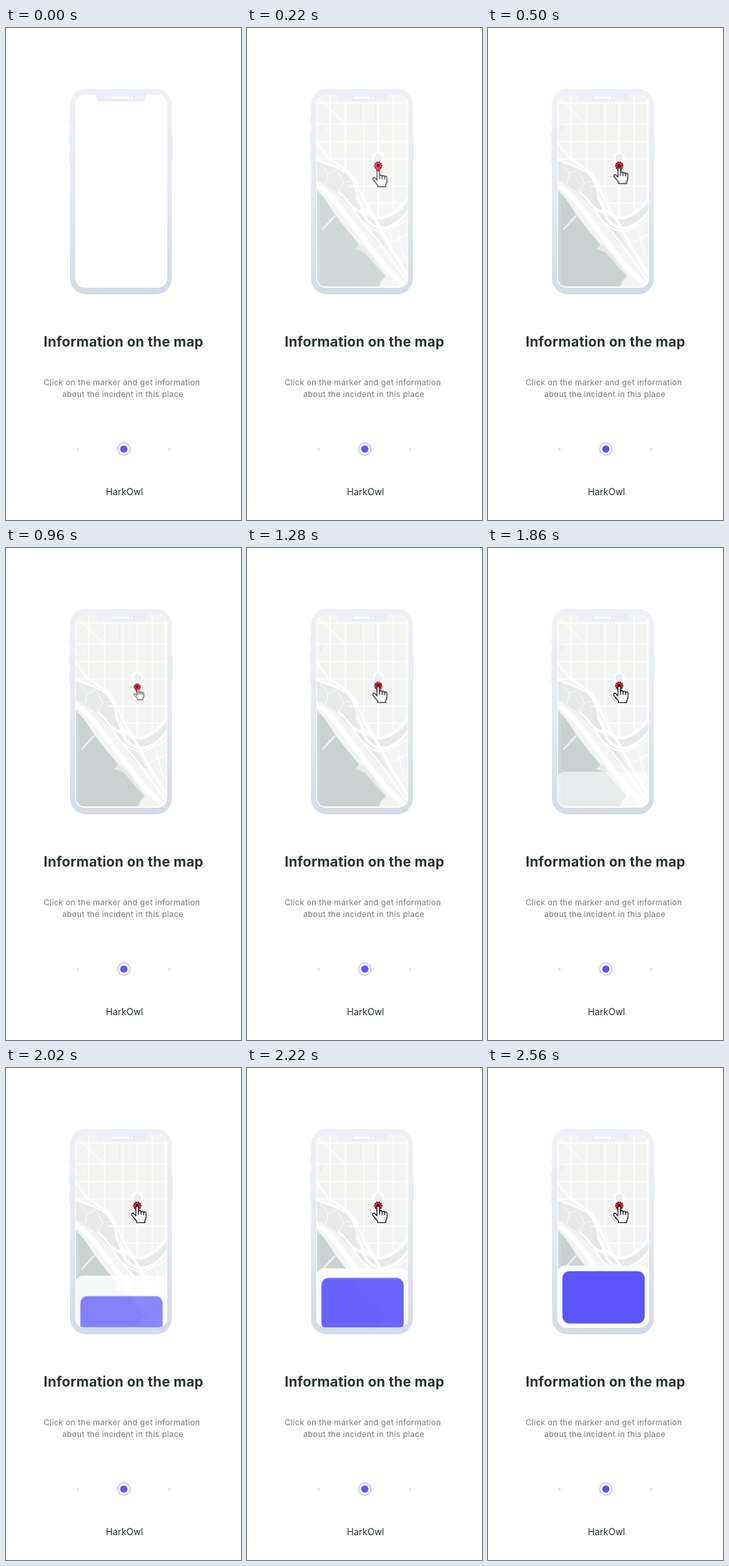
An HTML page for the animation above (2880 ms loop, 360x752 px).

```html
<!DOCTYPE html>
<html lang="en">
<head>
<meta charset="utf-8">
<title>Information on the map</title>
<style>
html, body { margin: 0; width: 100%; height: 100%; overflow: hidden; background: #fff; }
svg { display: block; width: 360px; height: 752px; }
text { font-family: Inter, "Open Sans", sans-serif; text-anchor: middle; fill: #263230; }
.title { font-size: 21px; font-weight: 700; letter-spacing: .3px; }
.body { font-size: 12.2px; letter-spacing: .3px; fill: #6f7977; }
.skip { font-size: 14px; }

/* the easing applies to each stretch between two keyframes */
.map, .pin, .hand, .sheet, .card {
  animation: show 2880ms cubic-bezier(.16, .72, .28, 1) infinite both;
}
.pin { animation-name: pin; transform-origin: 201px 221px; }
.hand { animation-name: hand; transform-origin: 204px 223px; }
.sheet { animation-name: sheet; }
.card { animation-name: card; }

@keyframes show {
  0%, .69% { opacity: 0; }
  19.44%, 100% { opacity: 1; }
}
@keyframes pin {
  0%, 19.44% { transform: none; }
  37.5%, 38.19% { transform: scale(.82); }
  50.7%, 100% { transform: none; }
}
@keyframes hand {
  0%, .69% { transform: translateY(40px); }
  17.36% { transform: translateY(2px) scale(.97); }
  37.5%, 38.19% { transform: scale(.67); }
  50.7%, 100% { transform: none; }
}
@keyframes sheet {
  0%, 59.72% { opacity: 0; transform: translateY(94px); }
  88.89%, 100% { opacity: 1; transform: none; }
}
@keyframes card {
  0%, 59.72% { opacity: 0; transform: translateY(138px); }
  88.89%, 100% { opacity: 1; transform: none; }
}
</style>
</head>
<body>
<svg viewBox="0 0 360 752">
  <defs>
    <linearGradient id="shell" x1="0" y1="0" x2="0" y2="1">
      <stop offset="0" stop-color="#eef1f5"/>
      <stop offset=".5" stop-color="#e4e9f3"/>
      <stop offset="1" stop-color="#d2dbe8"/>
    </linearGradient>
    <clipPath id="screen"><rect x="106.5" y="102.5" width="140" height="294" rx="14"/></clipPath>
    <clipPath id="view"><rect x="107" y="102.5" width="139" height="292.5" rx="13"/></clipPath>
  </defs>

  <!-- phone -->
  <g fill="#e8ecf4">
    <rect x="97" y="136" width="3" height="11" rx="1"/>
    <rect x="97" y="157" width="3" height="23" rx="1"/>
    <rect x="97" y="186" width="3" height="22" rx="1"/>
    <rect x="252" y="166" width="3.5" height="35" rx="1"/>
  </g>
  <rect x="98" y="93" width="156" height="314" rx="24" fill="url(#shell)"/>
  <rect x="106" y="102" width="141" height="295" rx="14.5" fill="#fff"/>

  <g clip-path="url(#view)">
    <g class="map">
      <path d="M106 102H247V397H106Z" fill="#f4f4f3"/>

      <!-- parks and shore blocks -->
      <g fill="#e6e9e8">
        <path d="M106 204L130 212L152 222L165 241L170 262L186 288L204 318L216 338L200 330L164 280L134 248L106 231Z"/>
        <path d="M173 280Q190 296 209 293Q229 287 246 268V281Q231 304 207 306Q190 303 173 280Z"/>
        <path d="M166 338L175 331L190 346L214 380L204 390Z"/>
        <ellipse cx="113" cy="153" rx="2" ry="3.5" fill="#eaecec"/>
      </g>

      <!-- water -->
      <path d="M106 247L120 262L135 285L152 307L172 331L166 338L180 343L199 365L212 379L206 386L202 397H106Z" fill="#c9d1d1"/>
      <path d="M106 247L112 254V397H106Z" fill="#cfd7d8"/>
      <path d="M135 287L115.500 308" stroke="#edf0f0" stroke-width="3.2"/>

      <!-- streets -->
      <g fill="none" stroke="#fff">
        <path stroke-width="1.6" d="M106 114.500H247M106 147H247M106 173.500H247M106 200H247M157 242H247M176 268H236M127 102V205M151 102V222M179 114V266M224 102V282M244 102V264"/>
        <path stroke-width="2.500" d="M201 110V290"/>
        <path stroke-width="1.500" d="M106 104L151 147"/>
        <path stroke-width="1" stroke="#e6e8e7" d="M173.500 116V145M196.500 116V145"/>
        <path stroke-width="1" d="M112 207L125 222L138 217L148 237L163 233M124 223L121 238M148 237L140 250"/>
        <path stroke-width="2.500" d="M106 174L124 198L156 220Q167 231 174 252L184 272"/>
        <path stroke-width="4.500" d="M184 272L204 305L222 339L250 384"/>
        <path stroke-width="2.500" d="M106 201L132 211L154 222Q167 236 169 257L181 282"/>
        <path stroke-width="8" d="M104 238Q127 252 146 279L182 327L213 366L248 400"/>
        <path stroke-width="3" d="M140 250Q157 264 170 288L202 327L224 358L248 390M153 264Q165 279 184 286"/>
        <path stroke-width="4" d="M168 258Q181 290 206 290Q226 288 247 259M175 276Q186 309 214 305Q233 299 247 279"/>
        <path stroke-width="2" d="M180 298Q198 316 216 309Q234 301 247 292"/>
        <path stroke-width="1.500" d="M214 331L247 315M236 358L247 350M230 307L240 350"/>
        <circle cx="201" cy="198.500" r="7.500" stroke-width="3" fill="#eceeee"/>
      </g>

      <g class="pin">
        <path d="M201 221L196.600 214A5.700 5.700 0 1 1 205.400 214Z" fill="#fb1233" stroke="#111" stroke-width="1.300" stroke-dasharray="2 1.600"/>
        <circle cx="201" cy="210" r="2.200" fill="#160508"/>
      </g>
      <g class="hand" stroke="#111" stroke-width="1.300" stroke-linejoin="round" stroke-linecap="round">
        <path fill="#fff" d="M199 226V213.200Q199 211.200 201 211.200T203 213.200V220Q203 218 205 218T207 220.200Q207.200 218.800 209 218.800T211 221Q211.200 219.800 212.800 219.800T214.500 222V228.500Q214.500 231 212.600 233V236.300H200V234L193 225.500Q191.800 223.400 193.300 222.400T196.300 223.200Z"/>
        <path fill="none" d="M203 220V224M207 220.500V224M211 221V224.500"/>
      </g>
    </g>
  </g>

  <g clip-path="url(#screen)">
    <g class="sheet">
      <rect x="106" y="302" width="141" height="110" rx="12" fill="#fff"/>
      <rect class="card" x="114" y="310.500" width="126" height="80" rx="11" fill="#5c55ff"/>
    </g>
  </g>

  <!-- notch -->
  <path d="M135 101H217Q214 102 214 105V107Q214 112.500 208.500 112.500H144Q138.500 112.500 138.500 107V105Q138.500 102 135 101Z" fill="#ebeef4"/>
  <rect x="162.500" y="105" width="26.500" height="3" rx="1.500" fill="#fff"/>
  <circle cx="193" cy="106.500" r="1.600" fill="#fff"/>

  <text class="title" x="180" y="486.500">Information on the map</text>
  <text class="body" x="177.500" y="545.500">Click on the marker and get information</text>
  <text class="body" x="179" y="563.500">about the incident in this place</text>

  <!-- page dots -->
  <g fill="#dfdcf8">
    <circle cx="110" cy="644" r="2"/>
    <circle cx="250" cy="644" r="2"/>
  </g>
  <circle cx="180.500" cy="643.500" r="9.500" fill="#fff" stroke="#cbc8fb" stroke-width="1.800"/>
  <circle cx="180.500" cy="643.500" r="5.500" fill="#5c55f5"/>

  <text class="skip" x="181.500" y="714">HarkOwl</text>
</svg>
</body>
</html>
```
